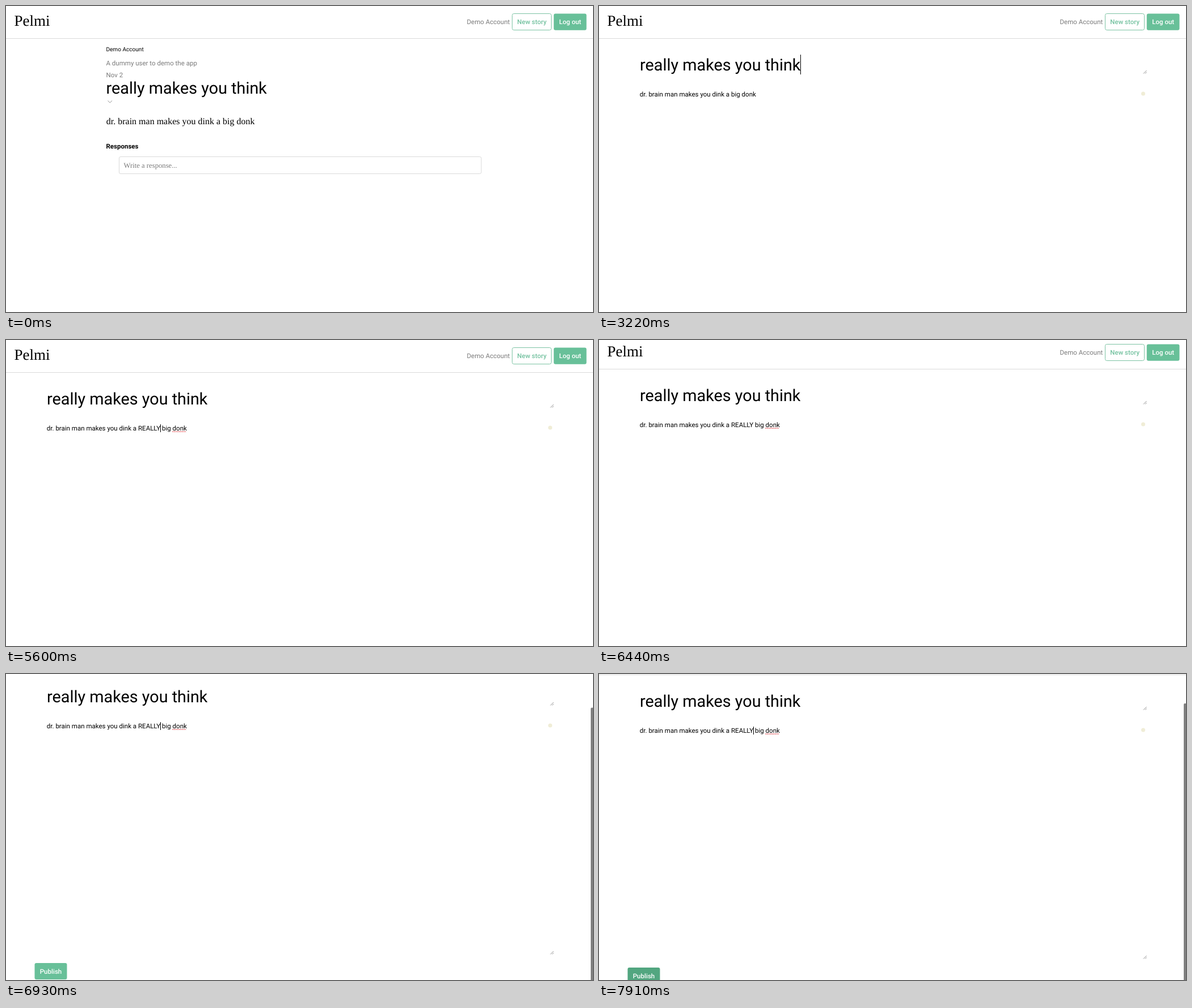
An HTML page that plays this animation: 1035 px wide and 541 px high, repeating every 8000 ms.

```html
<!DOCTYPE html>
<html lang="en">
<head>
<meta charset="utf-8">
<title>Story editor</title>
<style>
  html, body { margin: 0; width: 100%; height: 100%; overflow: hidden; background: #fff; }
  svg { display: block; }
  text { font: 11.52px Roboto, sans-serif; white-space: pre; text-rendering: geometricPrecision; }
  .serif { font-family: "Liberation Serif", serif; }
  .title { font-size: 28.8px; }
  .button { font-weight: 500; text-anchor: middle; }
  .grey { fill: #7b7b7b; }
  .line { fill: none; stroke: #909090; }
</style>
</head>
<body>
<svg width="1035" height="541" viewBox="0 0 1035 541">
  <defs>
    <path id="grip" class="line" d="M0 5.5 5.5 0M3 5.5 5.5 3"/>
  </defs>
  <g id="page">
    <text class="serif" x="14.5" y="34.5" style="font-size:27px">Pelmi</text>
    <text class="grey" x="812.5" y="32">Demo Account</text>
    <rect x="892.5" y="13.5" width="69" height="29" rx="3" fill="#fff" stroke="#7cc3a3"/>
    <text class="button" x="927.2" y="32" fill="#74c2a0">New story</text>
    <rect x="965.8" y="13.4" width="57.7" height="29.3" rx="3" fill="#68c099"/>
    <text class="button" x="994.7" y="32" fill="#fff">Log out</text>
    <rect y="57" width="1035" height="1" fill="#dadada"/>

    <g id="story">
      <text x="176.4" y="79.5" style="font-size:10.08px">Demo Account</text>
      <text class="grey" x="176.5" y="104.5">A dummy user to demo the app</text>
      <text class="grey" x="176.5" y="125.5">Nov 2</text>
      <text class="title" x="176.6" y="155.2">really makes you think</text>
      <path id="chevron" class="line" d="M179.5 167.3 183.3 171 187.1 167.3"/>
      <text class="serif" x="176.8" y="209" style="font-size:16px">dr. brain man makes you dink a big donk</text>
      <text x="176.5" y="252.3" style="font-weight:700">Responses</text>
      <rect x="199.5" y="266.5" width="638.5" height="30" rx="2.5" fill="#fff" stroke="#dadada"/>
      <text class="serif grey" x="207.5" y="286" style="font-size:12.7px">Write a response...</text>
      <g id="menu">
        <path d="M173.5 180H178L183.5 174.8 189 180H207.5Q211 180 211 183.5V219Q211 222.5 207.5 222.5H174Q170.5 222.5 170.5 219V183.5Q170.5 180 174 180Z" fill="#fff" stroke="#d6d6d6"/>
        <text x="174" y="195">Edit</text>
        <text x="174" y="216" fill="#dba0a0">Delete</text>
      </g>
    </g>

    <g id="editor">
      <text class="title" x="72.1" y="113.5">really makes you think</text>
      <rect id="titleCaret" x="355" y="86" width="1" height="35"/>
      <use href="#grip" x="960" y="114"/>
      <text id="body" x="71.8" y="160"></text>
      <path id="spelling" stroke="#e0484c" stroke-width="1.4" stroke-dasharray="1.6 1.2" d="M0 162h23.5"/>
      <rect id="bodyCaret" y="149" width="1" height="14"/>
      <circle cx="959.5" cy="155" r="3.5" fill="#f0edd6"/>
      <use href="#grip" x="960" y="554"/>
      <rect id="publish" x="50.5" y="575" width="57" height="29" rx="3"/>
      <text class="button" x="79" y="593.7" fill="#fff">Publish</text>
    </g>
  </g>
  <rect id="thumb" x="1031" width="5" height="541" rx="2" fill="#808080"/>
</svg>
<script>
const LOOP = 8000, STEP = 70, BLINK = 500;
const EDIT = 3010, TITLE_FOCUS = 3140, BODY_FOCUS = 4550;
const KEYS = [4900, 5110, 5250, 5320, 5460, 5530, 5590];
const HEAD = "dr. brain man makes you dink a", TYPED = " REALLY", TAIL = " big donk";
const SCROLL = [[6230, 0], [6440, 6], [6510, 47], [6580, 62], [6650, 67],
  [6790, 68], [7070, 59], [7140, 57], [7420, 57], [7490, 56]];

const el = id => document.getElementById(id);
const show = (id, on) => { el(id).style.display = on ? "" : "none"; };
const within = (t, from, to) => t >= from && t < to;
const blink = (t, start) => t >= start && Math.floor((t - start) / BLINK) % 2 === 0;

function scrollAt(t) {
  const i = SCROLL.findIndex(p => p[0] > t);
  if (i === 0) return 0;
  if (i < 0) return SCROLL.at(-1)[1];
  const [t0, a] = SCROLL[i - 1], [t1, b] = SCROLL[i];
  return Math.round(a + (b - a) * (t - t0) / (t1 - t0));
}

function drawBody(t) {
  const count = KEYS.filter(k => k <= t).length;
  const text = HEAD + TYPED.slice(0, count) + TAIL;
  const body = el("body");
  if (body.textContent !== text) body.textContent = text;
  const caretX = body.getEndPositionOfChar(HEAD.length + count - 1).x;
  el("bodyCaret").setAttribute("x", Math.round(caretX - 0.5));
  const wordX = body.getStartPositionOfChar(text.length - 4).x;
  el("spelling").setAttribute("transform", `translate(${wordX})`);
  show("bodyCaret", blink(t, count ? KEYS[count - 1] : BODY_FOCUS));
  show("spelling", t >= BODY_FOCUS + STEP);
}

function draw(time) {
  const t = Math.floor(time % LOOP / STEP) * STEP;
  const editing = t >= EDIT, scroll = scrollAt(t);
  show("story", !editing);
  show("editor", editing);
  show("menu", t >= 2030);
  el("chevron").style.stroke = within(t, 1610, 2310) ? "#111" : "";
  if (editing) drawBody(t);
  show("titleCaret", t < BODY_FOCUS && blink(t, TITLE_FOCUS));
  el("publish").setAttribute("fill", t < 7630 ? "#68c099" : t < 7700 ? "#5db38c" : "#52a680");
  el("page").setAttribute("transform", `translate(0 ${-scroll})`);
  show("thumb", t >= 6510);
  el("thumb").setAttribute("y", scroll * 0.93);
}

let start;
function tick(now) {
  start ??= now;
  draw(now - start);
  requestAnimationFrame(tick);
}
requestAnimationFrame(tick);
</script>
</body>
</html>
```
